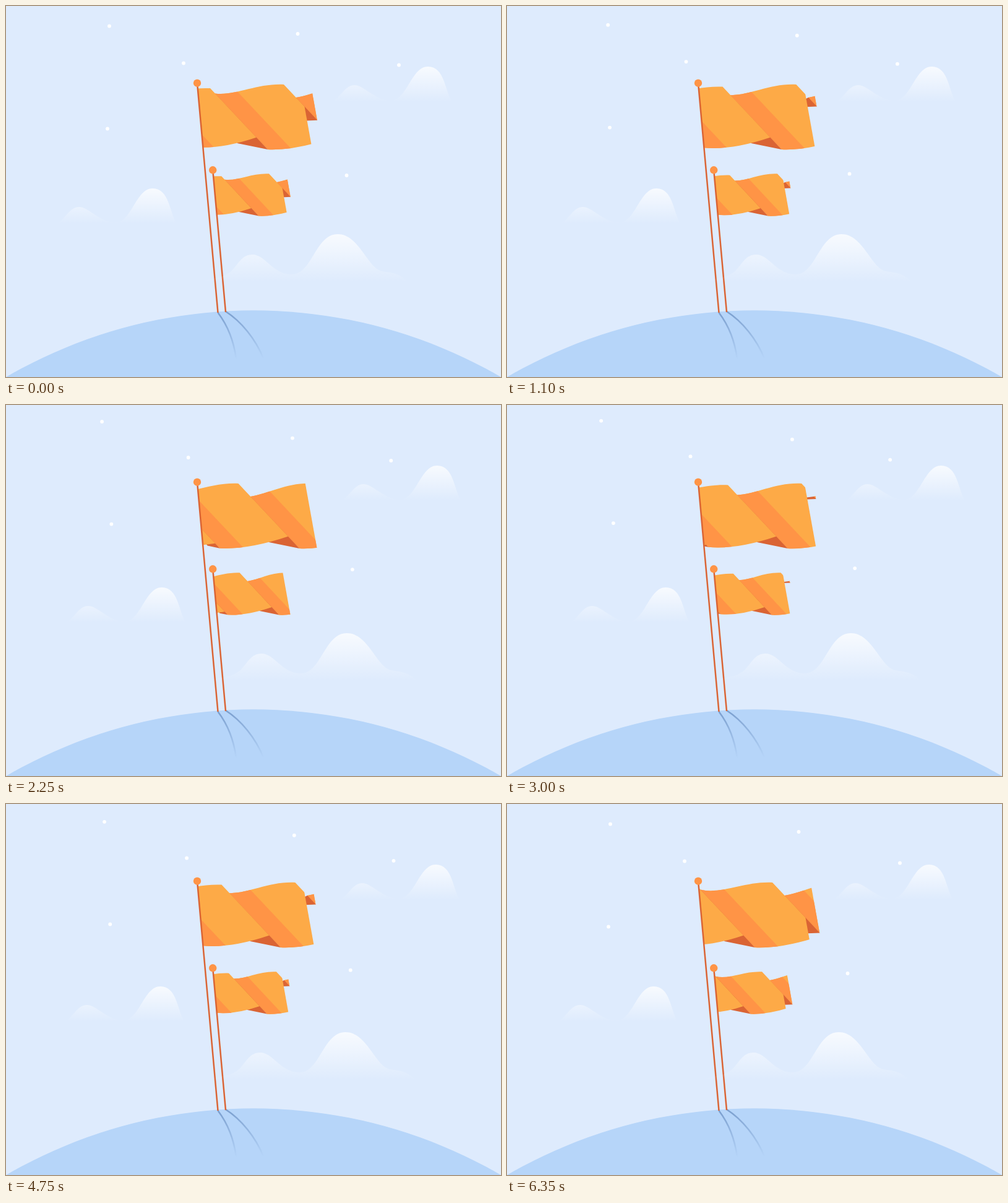
An HTML page with a canvas for the animation above (6.4 s loop, 800 by 600 pixels).

```html
<!DOCTYPE html>
<html lang="en">
<head>
<meta charset="utf-8">
<title>Flags on a hill</title>
<style>
html, body { margin: 0; width: 100%; height: 100%; overflow: hidden; background: #deebfd; }
canvas { display: block; width: 800px; height: 600px; }
</style>
</head>
<body>
<canvas id="stage" width="800" height="600"></canvas>
<script>
const ctx = document.getElementById('stage').getContext('2d');
const LOOP = 6400, STEPS = 77, WAVE = 11;
const SPACING = 119;   // distance between folds
const LEAN = 0.94;     // x per y along a fold
const SLANT = 0.18;    // x per y along the free end
const BAND = 39;       // width of the orange stripe
const YELLOW = '#fdaa47', ORANGE = '#ff9446', DARK = '#da6434';

// Drifting dots: x, y, travel x, travel y
const DOTS = [[167, 32.5, -15, -7], [635, 95.5, -16, -7], [471.5, 45, -10.7, 10.8],
  [287, 92.5, 9.6, -9.4], [164, 198.5, 8, -7.5], [550.5, 274, 11.8, -10]];

const SMALL = new Path2D('M526 155C540 150 547 128 563 128S596 153 622 153S655 98 682 98S709 137 721 155Z');
const LARGE = new Path2D('M312 446C330 440 350 442 365 428C376 416 382 402 398 402C420 402 430 434 462 434' +
  'C495 434 500 369 536 369C571 369 584 424 608 429C624 432 632 430 650 446Z');

const clamp = (v, lo, hi) => Math.max(lo, Math.min(hi, v));
const ease = k => (1 - Math.cos(Math.PI * k)) / 2;

function path(...points) {
  const p = new Path2D();
  points.forEach(q => p.lineTo(...q));
  p.closePath();
  return p;
}

function fill(color, shape) {
  ctx.fillStyle = color;
  ctx.fill(shape);
}

function disc(x, y, r, color) {
  const p = new Path2D();
  p.arc(x, y, r, 0, Math.PI * 2);
  fill(color, p);
}

// Where the cloth ends, at y = 129, for the panel left of the fold at c
function endAt(c) {
  const d = c - 494;
  return 484 + 0.15 * d - 0.0004 * d * d;
}

// A fold runs diagonally down from its crest at x = c
function fold(c) {
  const top = 127 + clamp((375 - c) * 0.135, 0, 10);
  const foot = 232 - clamp((260 - c) * 0.1, 0, 7);
  const at = drop => [c + LEAN * drop, top + drop];
  const room = (endAt(c + SPACING) - c) / (LEAN - SLANT);
  const reach = clamp(room, 0, foot - top);
  const depth = clamp((c - 300) * 0.28, 2, 21);
  const open = clamp((c - 220) / 90, 0, 1);
  const tip = at(reach);
  const lift = Math.min(12, (foot - tip[1]) / 2);
  return {
    c, at, tip, depth, reach,
    crest: at(0),
    valley: at(depth),
    bend: at(foot - top - 19.5 * open),
    back: [tip[0] - 49 * open, tip[1] - 10 * open + lift]
  };
}

// Cloth between two neighbouring folds, and its turned-back corner
function panel(prev, next) {
  if (prev.reach <= prev.depth) return;
  const [vx, vy] = prev.valley, [kx, ky] = next.crest;
  const [tx, ty] = prev.tip, [bx, by] = next.bend;
  const dx = kx - vx;

  const shape = new Path2D();
  shape.moveTo(vx - 2, vy + 2);
  shape.lineTo(vx, vy);
  shape.bezierCurveTo(vx + dx * 0.3, vy + 10 - 0.7 * prev.depth, kx - dx * 0.4, ky - 2, kx, ky);
  shape.lineTo(bx, by);
  shape.quadraticCurveTo(tx + (bx - tx) * 0.42, 234, tx, ty);
  shape.closePath();

  const end = y => [endAt(next.c) + SLANT * (y - 129), y];
  const beside = (drop, dist) => {
    const [x, y] = prev.at(drop);
    return [x + dist, y];
  };
  ctx.save();
  ctx.clip(path([0, 90], end(90), end(260), [0, 260]));
  fill(YELLOW, shape);
  ctx.clip(shape);
  fill(ORANGE, path(beside(-20, -20), beside(-20, BAND), beside(130, BAND), beside(130, -20)));
  ctx.restore();
  fill(DARK, path(prev.valley, prev.tip, prev.back));
}

function flag(first) {
  ctx.save();
  ctx.clip(path([306.8, 100], [560, 100], [560, 250], [320.3, 250]));
  for (let k = 1; k >= -2; k--) {
    panel(fold(first + k * SPACING), fold(first + (k + 1) * SPACING));
  }
  ctx.restore();
}

function pole(x, y, footX, footY) {
  ctx.strokeStyle = DARK;
  ctx.lineWidth = 2.5;
  ctx.stroke(path([x, y], [footX, footY]));
  disc(x, y, 6.2, ORANGE);
}

function fade(color, top, bottom, alpha) {
  const g = ctx.createLinearGradient(0, top, 0, bottom);
  g.addColorStop(0, `rgba(${color},${alpha})`);
  g.addColorStop(1, `rgba(${color},0)`);
  return g;
}

function cloud(shape, x, y, top, bottom) {
  ctx.save();
  ctx.translate(x, y);
  fill(fade('255,255,255', top, bottom, 0.78), shape);
  ctx.restore();
}

function shadow(x, y, c1x, c1y, c2x, c2y, ex, ey) {
  ctx.strokeStyle = fade('122,158,206', y, ey, 1);
  ctx.lineWidth = 2.5;
  ctx.beginPath();
  ctx.moveTo(x, y);
  ctx.bezierCurveTo(c1x, c1y, c2x, c2y, ex, ey);
  ctx.stroke();
}

function draw(n) {
  ctx.fillStyle = '#deebfd';
  ctx.fillRect(0, 0, 800, 600);

  const sway = ease(2 * n / STEPS);
  for (const [x, y, dx, dy] of DOTS) disc(x + dx * sway, y + dy * sway, 2.9, '#fff');

  disc(400, 492.3 + 796, 796, '#b6d5f9');
  shadow(342.5, 496, 357, 515, 368, 540, 372, 571);
  shadow(355, 494, 380, 510, 403, 538, 416, 570);

  // The wave runs at an almost even pace, a little slower at first
  const p = n % WAVE;
  const first = 330 + 9.9 * p - 4 * Math.sin(Math.PI * p / 10) ** 2;
  flag(first);
  pole(309, 124.7, 342.5, 496);
  ctx.save();
  ctx.translate(336 - 311 * 0.645, 271.3 - 127 * 0.65);
  ctx.scale(0.645, 0.65);
  flag(first);
  ctx.restore();
  pole(334.2, 265.3, 355, 495);

  const drift = 20.6 * (n < 42 ? ease(n / 42) : ease((STEPS - n) / 35));
  cloud(SMALL, drift, 0, 98, 155);
  cloud(SMALL, drift - 445, 197, 98, 155);
  cloud(LARGE, drift, 0, 369, 446);
}

const start = performance.now();
function tick() {
  const t = Math.max(0, performance.now() - start) % LOOP;
  // Twelve drawings a second, shown on a 50 ms beat
  draw(Math.floor((Math.floor(t / 50) + 0.5) * 0.6));
  requestAnimationFrame(tick);
}
tick();
</script>
</body>
</html>
```
